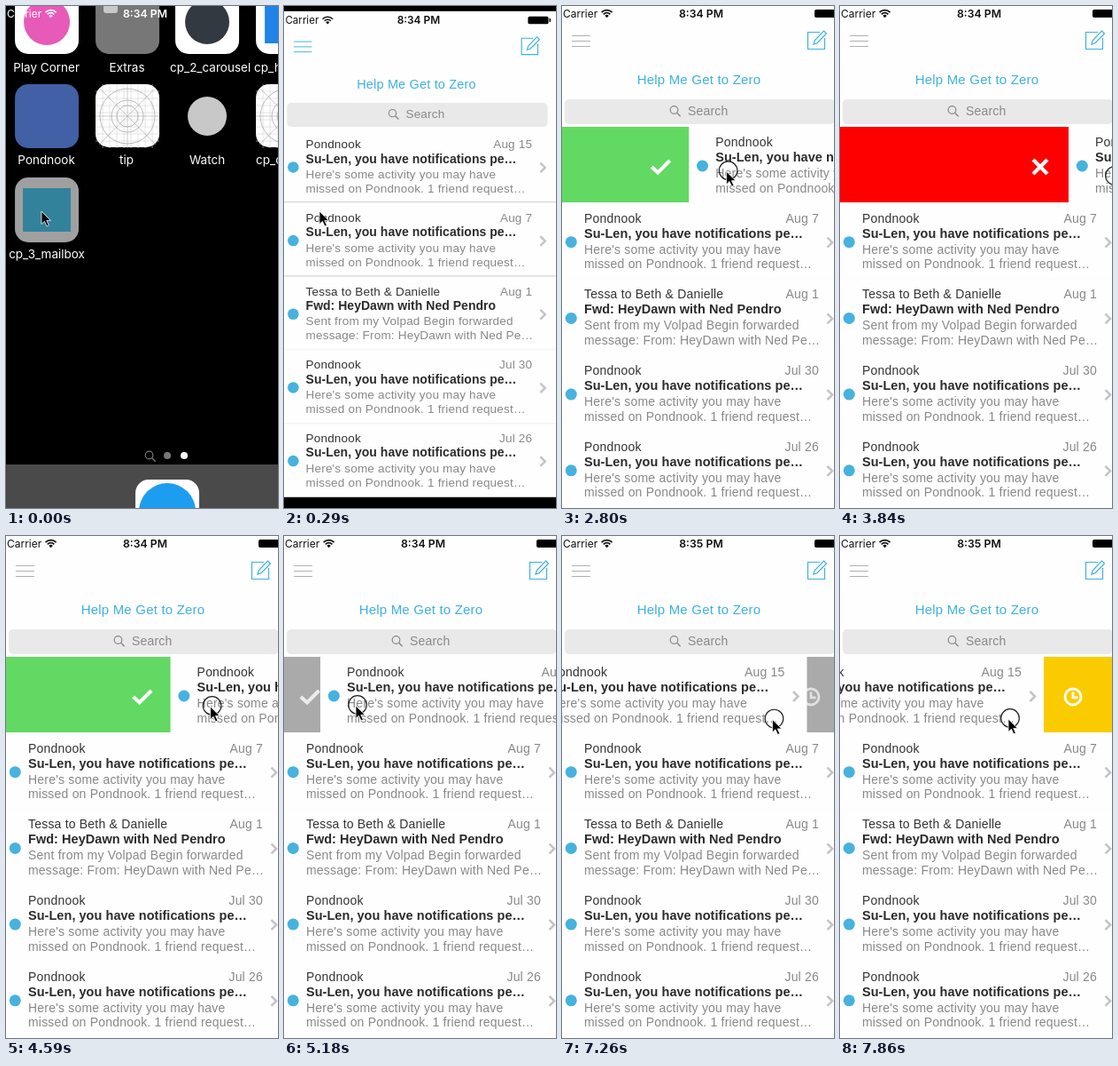
Write an HTML page that moves like this. It is 307 by 565 pixels and loops after 8 s.

```html
<!DOCTYPE html>
<html lang="en">
<head>
<meta charset="utf-8">
<title>Mail swipe</title>
<style>
  html, body { margin: 0; width: 100%; height: 100%; overflow: hidden; background: #000; }
  svg { display: block; width: 307px; height: 565px; }
  text { font: 14px "Liberation Sans", Arial, sans-serif; letter-spacing: .2px; white-space: pre; }
  .status text { font: 12px Inter, sans-serif; letter-spacing: 0; }
  .status .clock { font-weight: 600; font-size: 12.3px; text-anchor: middle; }
  .label { font: 13.5px Inter, sans-serif; letter-spacing: 0; fill: #fff; }
  .mid { text-anchor: middle; }
  .title { font-size: 14.5px; font-weight: 700; letter-spacing: .04px; fill: #2b2b2b; }
  .from { fill: #333; }
  .soft { fill: #888; }
  .date { fill: #888; text-anchor: end; }
  .line { fill: none; }
</style>
</head>
<body>
<svg id="stage" viewBox="0 0 307 565" xmlns="http://www.w3.org/2000/svg"></svg>
<script>
const LOOP = 8000;
const BLUE = '#3db2df';

// Motion tables: [ms, value...]
const zoomKeys = [[0, .225], [142, .225], [143, .68], [291, .9645], [440, .992], [588, 1]];
const dragKeys = [
  [1756, 0], [1904, 12], [2053, 36], [2201, 63], [2350, 90], [3540, 245], [3690, 258], [3838, 263],
  [4280, 263], [4290, 250], [4590, 190], [4884, 112], [5032, 76], [5181, 46], [5330, 18], [5480, 0],
  [6670, 0], [6818, -4], [7709, -73], [7860, -85]
];
const pointerKeys = [
  [0, 40, 231], [588, 40, 231], [1170, 37, 186], [1755, 34, 179], [2350, 124, 184], [3540, 288, 190],
  [3838, 308, 192], [4280, 308, 192], [4290, 293, 192], [4590, 230, 192], [4884, 148, 191],
  [5181, 81, 191], [5480, 36, 190], [6074, 230, 216], [6371, 282, 209], [6520, 283, 211],
  [6670, 277, 208], [6818, 273, 207], [7860, 190, 206]
];
const runs = [0, 143, 1310, 2500, 3690, 4290, 5480, 6670, 7860];

function snap(t) {
  const start = runs.filter(r => r <= t).pop();
  return start + Math.min(7, Math.floor((t - start) / 146.5)) * 148.5;
}

function at(keys, t) {
  const i = keys.findIndex(k => k[0] > t);
  if (i === 0) return keys[0].slice(1);
  if (i < 0) return keys[keys.length - 1].slice(1);
  const a = keys[i - 1], b = keys[i], p = (t - a[0]) / (b[0] - a[0]);
  return a.slice(1).map((v, n) => v + (b[n + 1] - v) * p);
}

const text = (x, y, cls, s) => `<text x="${x}" y="${y}" class="${cls}">${s}</text>`;
const rect = (x, y, w, h, fill, r = 0) =>
  `<rect x="${x}" y="${y}" width="${w}" height="${h}" rx="${r}" fill="${fill}"/>`;
const dot = (x, y, r, fill) => `<circle cx="${x}" cy="${y}" r="${r}" fill="${fill}"/>`;
const line = (d, color, w = 1) => `<path class="line" d="${d}" stroke="${color}" stroke-width="${w}"/>`;
const lens = (x, y, color) =>
  `<circle class="line" cx="${x - 1}" cy="${y - 1}" r="4.3" stroke="${color}" stroke-width="1.2"/>` +
  line(`M${x + 2.2} ${y + 2.2}l4 4`, color, 1.4);

function status(color) {
  return `<g class="status" fill="${color}">${text(1, 12.5, '', 'Carrier')}
    ${line('M44.6 7.2a8.4 8.4 0 0 1 12 0M46.8 9.3a5.3 5.3 0 0 1 7.6 0', color, 1.7)}
    <path d="M50.6 13.2l-2.2-2.3a3.2 3.2 0 0 1 4.4 0z"/>
    ${text(157, 12.5, 'clock', '8:34 PM')}</g>`;
}

function gridTile(x, y) {
  let d = '';
  for (let i = 1; i < 9; i++) d += `M${i * 8} 0V72M0 ${i * 8}H72`;
  const rings = [12, 18, 31].map(r => `<circle class="line" cx="36" cy="36" r="${r}" stroke="#aaa" stroke-width=".8"/>`);
  return `<g transform="translate(${x} ${y})">${rect(0, 0, 72, 71, '#fff', 15)}
    ${line(d, '#d6d6d6', .6)}${line('M4 4L68 68M68 4L4 68M36 0V72M0 36H72', '#aaa', .6)}${rings.join('')}</g>`;
}

function home() {
  const tile = (x, y, fill) => rect(x, y, 72, 72, fill, 15);
  return tile(10, -18, '#fff') + dot(46, 18, 26, '#e85ab8') +
    tile(101, -18, '#777') + rect(110, -8, 16, 16, '#c9c9c9', 3) +
    tile(191, -18, '#fff') + dot(227, 18, 25, '#333940') +
    tile(282, -18, '#fff') + rect(292, -8, 52, 50, '#1f83e8') +
    tile(10, 88, '#4160a5') + gridTile(101, 88) + dot(227, 124, 22, '#c8c8c8') + gridTile(282, 88) +
    rect(10, 193, 72, 73, '#a0a0a0', 15) + rect(19, 205, 54, 49, '#33829b') +
    text(45.5, 74, 'label mid', 'Play Corner') + text(136.5, 74, 'label mid', 'Extras') +
    text(230.5, 74, 'label mid', 'cp_2_carousel') + text(280, 74, 'label', 'cp_house') +
    text(45.5, 178, 'label mid', 'Pondnook') + text(136, 178, 'label mid', 'tip') +
    text(227, 178, 'label mid', 'Watch') + text(282, 178, 'label', 'cp_class') +
    text(46, 284, 'label mid', 'cp_3_mailbox') +
    lens(162.5, 506.5, '#777') + dot(182, 506, 4, '#777') + dot(201, 506, 4, '#fff') +
    rect(0, 516, 307, 60, '#4a4a4a') + tile(146, 533, '#fff') + dot(182, 569, 32, '#1c9df0');
}

const notice = ['Pondnook', 'Su-Len, you have notifications pe…',
  "Here's some activity you may have", 'missed on Pondnook. 1 friend request…'];
const forward = ['Tessa to Beth &amp; Danielle', 'Fwd: HeyDawn with Ned Pendro',
  'Sent from my Volpad Begin forwarded', 'message: From: HeyDawn with Ned Pe…'];
const mails = [['Aug 15', notice], ['Aug 7', notice], ['Aug 1', forward], ['Jul 30', notice], ['Jul 26', notice]];

function row([date, [from, title, a, b]], i) {
  return `<g id="row${i}" transform="translate(0 ${i * 85.7})">${rect(-5, 136, 320, 85, '#fefefe')}
    ${dot(10.3, 180, 6.5, '#46b2de')}${text(25, 158, 'from', from)}${text(290, 158, 'date', date)}
    ${text(25, 175, 'title', title)}${text(25, 193, 'soft', a)}${text(25, 209.5, 'soft', b)}
    ${line('M299.5 175l5.5 5.5-5.5 5.5', '#c4c4c8', 2.6)}</g>`;
}

function app() {
  return rect(-5, -2, 330, 567, '#fefefe') + status('#111') +
    rect(285, 4, 24, 9, '#000', 2) + rect(310, 6.5, 1.5, 4, '#000') +
    `<path id="menu" class="line" d="M11 33.5H32M11 39.5H32M11 45.5H32"/>` +
    line('M291 29.5H277.5V48.5H296.5V36', BLUE, 1.2) +
    line('M284 43l1.2-4.2L295.5 28l3 3L288 41.7z', BLUE, 1.2) +
    `<text x="154.5" y="88" class="mid" fill="${BLUE}" style="font-size:15px">Help Me Get to Zero</text>` +
    rect(3, 105, 305, 28, '#e9e9ea', 5) + lens(127.5, 118, '#888') + text(142, 123, 'soft', 'Search') +
    `<rect id="panel" x="-5" y="136" width="320" height="85"/>
     <g id="icon" class="line" stroke="#fff">
       <path id="check" d="M-10 0l7 6.5L10.5-7" stroke-width="4"/>
       <path id="cross" d="M-8-8L8 8M8-8L-8 8" stroke-width="4.2"/>
       <path id="later" d="M-9 0a9 9 0 1 0 18 0a9 9 0 1 0-18 0M0-5.5V.8H5.5" stroke-width="2.8"/>
     </g>` + mails.map(row).join('') +
    `<g id="rules">${line('M-5 220.6H325M-5 307H325', '#ccc')}${line('M-5 393H325M-5 479H325', '#eee')}</g>`;
}

const stage = document.getElementById('stage');
stage.innerHTML = rect(0, 0, 307, 565, '#000') +
  `<g id="home"><g id="springboard">${home()}</g>${status('#fff')}</g>
   <g id="app">${app()}</g>
   <g id="pointer">
     <circle id="press" class="line" cx="2" cy="-1" r="10.3" stroke="#222" stroke-width="1.2"/>
     <path d="M0 0V14.5l3.4-3.2 2.6 5.6 2.4-1.1-2.6-5.4h4.7z" fill="#000" stroke="#fff" stroke-width=".8"/>
   </g>`;

const el = id => document.getElementById(id);
const show = (id, on) => el(id).setAttribute('visibility', on ? 'visible' : 'hidden');
const set = (id, name, v) => el(id).setAttribute(name, v);
const clock = stage.querySelector('#app .clock');

function panelColor(d) {
  if (d > 255) return '#f00';
  if (d > 60) return '#62d962';
  return d < -60 ? '#facc00' : '#aaa';
}

function draw(t) {
  const [s] = at(zoomKeys, t), [d] = at(dragKeys, t), [px, py] = at(pointerKeys, t);
  const grow = s / .225;
  show('home', t < 291);
  show('app', t >= 143);
  set('springboard', 'transform',
    `translate(${13 * (1 - s)} ${193 - (grow - 1) * 20}) scale(${grow}) translate(-10 -193)`);
  set('app', 'transform', `translate(${13 * (1 - s)} ${220 * (1 - s)}) scale(${s})`);
  set('menu', 'stroke', t < 440 ? BLUE : '#b0b0b0');
  set('rules', 'opacity', t < 440 ? 1 : 0);
  clock.textContent = t < 6000 ? '8:34 PM' : '8:35 PM';

  set('row0', 'transform', `translate(${d} 0)`);
  set('panel', 'fill', d ? panelColor(d) : '#fefefe');
  set('icon', 'transform', `translate(${d > 0 ? Math.max(29, d - 37) : Math.min(281, 348 + d)} 181)`);
  set('icon', 'opacity', Math.min(1, Math.abs(d) / 60));
  set('check', 'opacity', d > 0 && d <= 255 ? 1 : 0);
  set('cross', 'opacity', d > 255 ? 1 : 0);
  set('later', 'opacity', d < 0 ? 1 : 0);

  set('pointer', 'transform', `translate(${px} ${py})`);
  show('press', (t >= 1600 && t < 5480) || t >= 6670);
}

const begin = performance.now();
function tick() {
  draw(snap((performance.now() - begin) % LOOP));
  requestAnimationFrame(tick);
}
tick();
</script>
</body>
</html>
```
